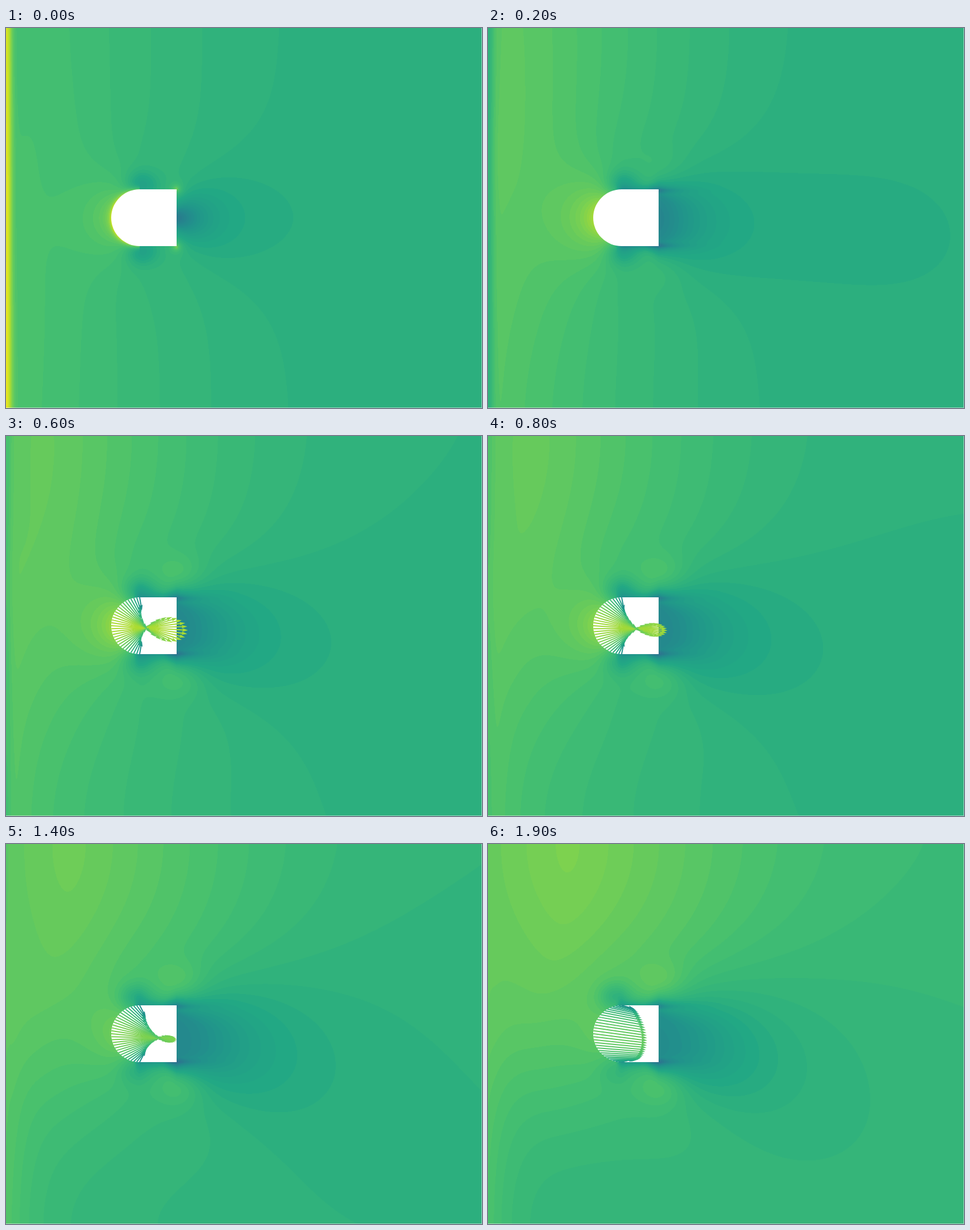
These frames come from a looping animation (837x669 px, 2 s). An HTML page with a canvas:

```html
<!DOCTYPE html>
<html lang="en">
<head>
<meta charset="utf-8">
<title>Flow around a blunt body</title>
<style>
  html, body { margin: 0; width: 100%; height: 100%; overflow: hidden; background: #fff; }
  canvas { display: block; }
</style>
</head>
<body>
<canvas id="stage" width="837" height="669"></canvas>
<script>
const W = 837, H = 669, LOOP = 2000, STEP = 100, FORCES_FROM = 300;
const SCALE = 64;   // field units across the whole colour ramp
const BANDS = 74;   // visible colour steps across the ramp
const CELL = 4, COLS = Math.ceil(W / CELL) + 1, ROWS = Math.ceil(H / CELL) + 1;
const BODY = { cx: 235, cy: 334, r: 50, right: 300 };
const ctx = document.getElementById('stage').getContext('2d');
const { exp, log1p, hypot, min, max, abs, cos, sin, floor, sqrt, PI } = Math;

const RAMP = ['440154', '482475', '414487', '355f8d', '2a788e', '21918c',
              '22a884', '44bf70', '7ad151', 'bddf26', 'fde725']
  .map(h => [0, 2, 4].map(i => parseInt(h.substr(i, 2), 16)));

const clamp = (v, lo, hi) => min(hi, max(lo, v));
const smooth = v => { v = clamp(v, 0, 1); return v * v * (3 - 2 * v); };
const softplus = u => u > 30 ? u : log1p(exp(u));
const bell = u => exp(-u * u);

function colour(level) {
  const v = clamp(level / SCALE, 0, 1) * 10, i = min(9, floor(v)), f = v - i;
  return RAMP[i].map((c, k) => Math.round(c + (RAMP[i + 1][k] - c) * f));
}
const PALETTE = Array.from({ length: BANDS }, (_, i) => {
  const [r, g, b] = colour((i + .5) * SCALE / BANDS);
  return (255 << 24 | b << 16 | g << 8 | r) >>> 0;
});

// An impulsive start dies out quickly; the rest drifts slowly.
function flowAt(t) {
  const kick = exp(-t / 60), drift = t / 1900, settled = min(1, t / 600);
  const lowBase = 39.6 + .5 * kick + .8 * settled + 1.8 * drift ** 5;
  return {
    drift, settled, kick,
    age: min(1, t / 200),
    lowBase,
    lowX: 410 + 60 * drift,
    lowGain: 2 - .5 * kick - 2.2 * drift,
    topBase: lowBase + .9 * smooth(drift),
    topX: 410 - 20 * kick + 125 * drift,
    topGain: 2.4 - .85 * kick,
    peakX: 30 + 25 * kick + 110 * drift,
    inlet: min(4.5, 6 * drift),
    strip: 28 * kick - 12 * exp(-t / 400),
    wake: 14 + 4 * kick,
    wakeSize: 62 + 88 * drift ** .55,
    tilt: .13 * sqrt(drift),
    nose: 32 - 26 * drift,
    noseSize: 45 - 13 * kick
  };
}

function forcesAt(t) {
  const v = (t - 600) / 1300, u = (t - 1150) / 1000;
  const reach = 135 - 29 * v - 11 * v ** 4;
  const drag = 4 + 18 * v * v;
  const push = clamp(77 - 195 * u ** 3 - 8 * u, 8, reach - 14);
  return {
    drag, push,
    bulge: reach - drag - push,
    endPush: 23 - 17 * v ** 4,
    lift: 8 + 4 * v,
    level: 56 - 7.5 * v
  };
}

function broadField(x, y, p) {
  const xs = x + 60 * bell((y - BODY.cy) / 130);
  const px = p.peakX + hypot(xs - p.peakX, 30);
  const top = p.topBase + p.topGain * softplus((p.topX - px) / 110);
  const low = p.lowBase + p.lowGain * softplus((p.lowX - xs) / 110) + p.inlet * exp(-x / 45);
  let v = top + (low - top) * smooth(y / H);

  const back = x - 270;
  if (back > 0) {
    const dy = abs(y - BODY.cy - p.tilt * back);
    const shade = 38 * p.age * exp(-max(0, x - BODY.right) / 60);
    const side = max(0, dy - shade);
    const c2 = back * back / (back * back + side * side);
    v -= p.wake * c2 * c2 / (1 + (hypot(back, dy) / p.wakeSize) ** 2.5);
  }
  const front = 240 - x;
  if (front > 0) {
    const r = hypot(front, y - BODY.cy);
    v += p.nose * (front / r) ** 1.5 / (1 + (r / p.noseSize) ** 2);
  }
  return v;
}

// Shoulder suction, side lumps, boundary layers and bright edges.
function nearField(x, y, p) {
  const dy = abs(y - BODY.cy);
  const suction = y < BODY.cy ? 5.5 : 5.5 - 3.3 * p.drift;
  let v = -suction * bell((x - 238 + 16 * p.drift) / 27) * bell((dy - 58 - 8 * p.drift) / 24);
  v += 2.4 * p.settled * bell((x - 305) / 42) * bell((dy - 94) / 32);
  if (dy > 40) {
    v -= 9 * p.age * smooth((x - 222) / 14) * smooth((dy - 40) / 10)
       * exp(-max(0, dy - BODY.r) / (4 + 5 * p.settled))
       * exp(-max(0, x - BODY.right) / 25);
  }
  const glow = 10 * p.kick;
  if (x < BODY.cx) v += glow * exp(-max(0, hypot(x - BODY.cx, dy) - BODY.r) / 4);
  return v + glow * exp(-hypot(x - 299, dy - 51) / 6);
}

const image = ctx.createImageData(W, H);
const pixels = new Uint32Array(image.data.buffer);
const grid = new Float32Array(COLS * ROWS);

function drawField(t) {
  const p = flowAt(t);
  for (let j = 0; j < ROWS; j++)
    for (let i = 0; i < COLS; i++)
      grid[j * COLS + i] = broadField(i * CELL, j * CELL, p);
  const strip = Array.from({ length: 40 }, (_, x) => p.strip * bell(x / 10));

  for (let y = 0; y < H; y++) {
    const j = floor(y / CELL), fy = y / CELL - j;
    const nearY = abs(y - BODY.cy) < 185;
    for (let x = 0; x < W; x++) {
      const i = floor(x / CELL), fx = x / CELL - i, k = j * COLS + i;
      const a = grid[k] + (grid[k + 1] - grid[k]) * fx;
      const b = grid[k + COLS] + (grid[k + COLS + 1] - grid[k + COLS]) * fx;
      let v = a + (b - a) * fy;
      if (x < 40) v += strip[x];
      if (nearY && x > 140 && x < 410) v += nearField(x, y, p);
      pixels[y * W + x] = PALETTE[clamp(floor(v * BANDS / SCALE), 0, BANDS - 1)];
    }
  }
  ctx.putImageData(image, 0, 0);

  // Soft last row and column
  ctx.fillStyle = 'rgba(255, 255, 255, .5)';
  ctx.fillRect(W - 1, 0, 1, H);
  ctx.fillRect(0, H - 1, W - 1, 1);
}

function drawBody() {
  const { cx, cy, r, right } = BODY;
  ctx.fillStyle = '#fff';
  ctx.beginPath();
  ctx.moveTo(right, cy - r);
  ctx.lineTo(cx, cy - r);
  ctx.arc(cx, cy, r, -PI / 2, PI / 2, true);
  ctx.lineTo(right, cy + r);
  ctx.fill();
}

function drawArrow(x, y, dx, dy, fill) {
  const len = hypot(dx, dy), head = min(10, len), neck = len - head * .88;
  ctx.save();
  ctx.translate(x, y);
  ctx.rotate(Math.atan2(dy, dx));
  ctx.fillStyle = fill;
  ctx.beginPath();
  ctx.moveTo(0, -1);
  ctx.lineTo(neck, -1);
  ctx.lineTo(len - head, -3);
  ctx.lineTo(len, 0);
  ctx.lineTo(len - head, 3);
  ctx.lineTo(neck, 1);
  ctx.lineTo(0, 1);
  ctx.fill();
  ctx.restore();
}

function drawForces(t) {
  const f = forcesAt(t), count = 31;
  for (let i = 0; i < count; i++) {
    const angle = PI * (i / (count - 1) - .5);
    const c = max(0, cos(angle)), s = sin(angle);
    const push = f.endPush + (f.push - f.endPush) * c ** 1.7;
    const rgb = colour(32 + (f.level - 32) * c ** .8);
    drawArrow(BODY.cx - BODY.r * c, BODY.cy - BODY.r * s,
      push * c + f.drag + f.bulge * c, push * s + f.lift * c, `rgb(${rgb})`);
  }
}

let start = null, shown = -1;
function tick(now) {
  if (start === null) start = now;
  const t = floor(((now - start) % LOOP) / STEP) * STEP;
  if (t !== shown) {
    shown = t;
    drawField(t);
    drawBody();
    if (t >= FORCES_FROM) drawForces(t);
  }
  requestAnimationFrame(tick);
}
requestAnimationFrame(tick);
</script>
</body>
</html>
```
